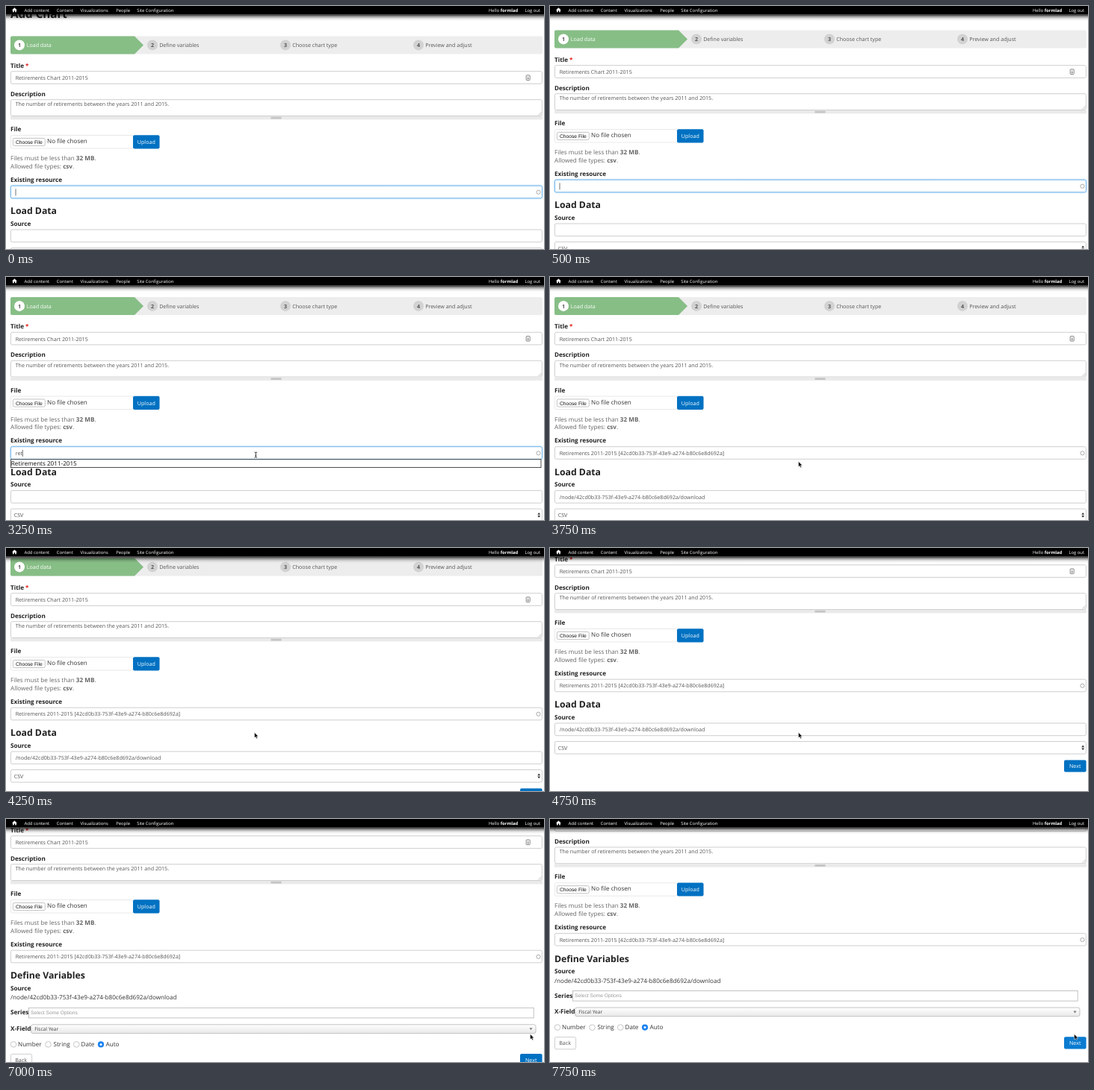
Recreate the animation shown at these times as an HTML page. Size 720 by 326 pixels, loop 8 s.

```html
<!DOCTYPE html>
<html lang="en">
<head>
<meta charset="utf-8">
<title>Add chart form</title>
<style>
  html, body { margin: 0; width: 100%; height: 100%; overflow: hidden; background: #fff; }
  svg { display: block; width: 100vw; height: 100vh; }
  text { font: 7.12px "Open Sans", sans-serif; fill: #555; text-rendering: geometricPrecision; white-space: pre; }
  .body { font-size: 8.13px; fill: #333; }
  .hint { font-size: 8.13px; fill: #666; }
  .label { font-size: 8.13px; font-weight: 700; fill: #222; }
  .h2 { font-size: 12.25px; font-weight: 700; fill: #222; }
  .h1 { font-size: 15.2px; font-weight: 700; fill: #222; }
  .bar { font-size: 5.92px; fill: #fff; }
  .native { font: 6.7px "Liberation Sans", Arial, sans-serif; fill: #111; }
  .chosen { font-size: 6.62px; fill: #444; }
  .white { fill: #fff; }
  .bold { font-weight: 700; }
  .red { fill: #e02020; }
  .box { fill: #fff; stroke: #c9c9c9; stroke-width: .9; }
  .focus { stroke: #66afe9; filter: drop-shadow(0 0 1.3px #66afe9aa); }
  .button { fill: #0071c2; }
  .hover { fill: #0a7bd0; }
</style>
</head>
<body>
<svg viewBox="0 0 720 326" preserveAspectRatio="none">
  <defs>
    <linearGradient id="shade" x2="0" y2="1">
      <stop offset="0" stop-color="#fff"/><stop offset="1" stop-color="#e8e8e8"/>
    </linearGradient>
    <linearGradient id="shadow" x2="0" y2="1">
      <stop offset="0" stop-color="#000" stop-opacity=".85"/>
      <stop offset=".3" stop-color="#000" stop-opacity=".4"/>
      <stop offset=".65" stop-color="#000" stop-opacity=".1"/>
      <stop offset="1" stop-color="#000" stop-opacity="0"/>
    </linearGradient>
  </defs>
  <g id="page">
    <g id="top"></g>
    <g id="load"></g>
    <g id="define"></g>
    <g id="menu"></g>
  </g>
  <g id="toolbar"></g>
  <path id="beam" d="M-1.8-3.6Q0-3.6 0-2.6Q0-3.6 1.8-3.6M0-2.6V2.6M-1.8 3.6Q0 3.6 0 2.6Q0 3.6 1.8 3.6M-.8 1H.8" fill="none" stroke="#111" stroke-width=".8"/>
  <path id="arrow" d="M0 0V7.3L1.7 5.8 2.8 8.3 4.1 7.7 3 5.3H5.2Z" stroke="#fff" stroke-width=".5"/>
</svg>
<script>
const $ = id => document.getElementById(id);
const LOOP = 8000, TICK = 250;

const text = (x, y, s, cls = '', id = '') => `<text x="${x}" y="${y}" class="${cls}" id="${id}">${s}</text>`;
const rect = (x, y, w, h, attrs = 'class="box"', r = 2) =>
  `<rect x="${x}" y="${y}" width="${w}" height="${h}" rx="${r}" ${attrs}/>`;
const circle = (x, y, r, attrs) => `<circle cx="${x}" cy="${y}" r="${r}" ${attrs}/>`;
const field = (y, h = 16.7, attrs) => rect(6.4, y, 711, h, attrs);
const button = (x, y, w, h, label, tx, id = '') =>
  rect(x, y, w, h, `class="button" id="${id}"`) + text(tx, y + h / 2 + 2.8, label, 'white');

const RESOURCE = '42cd0b33-753f-43e9-a274-b80c6e8d692a';
const PATH = `/node/${RESOURCE}/download`;
const PICKED = `Retirements 2011-2015 [${RESOURCE}]`;

const steps = ['Load data', 'Define variables', 'Choose chart type', 'Preview and adjust'].map((name, i) => {
  const x = 18 + 178 * i;
  return circle(x, 52.4, 7, `fill="${i ? '#d2d2d2' : '#fff'}"`)
    + text(x - 2, 55, i + 1, 'bold')
    + text(x + (i ? 9.2 : 9.7), 55, name, i ? '' : 'white');
}).join('');

$('top').innerHTML =
  text(6, 16, 'Add Chart', 'h1')
  + rect(6, 40.5, 712, 24, 'fill="#ededed"')
  + '<path d="M8 40.5H172L184 52.5 172 64.5H8Q6 64.5 6 62.5V42.5Q6 40.5 8 40.5Z" fill="#87be86"/>'
  + steps
  + text(6, 82.5, 'Title <tspan class="red">*</tspan>', 'label')
  + field(87.7)
  + text(12.7, 99.2, 'Retirements Chart 2011-2015')
  + rect(696.2, 92.9, 5, 6.6, 'fill="#fff" stroke="#777" stroke-width=".9"', .8)
  + '<path d="M698.7 94.6V97.4M697.6 97.5H699.8" stroke="#666" stroke-width=".8"/>'
  + text(6, 120.6, 'Description', 'label')
  + field(125.7, 21.8)
  + text(12.7, 134, 'The number of retirements between the years 2011 and 2015.')
  + '<path d="M712.5 146.5L716.5 142.5M714.8 146.5L716.5 144.8" stroke="#999" stroke-width=".6"/>'
  + rect(6, 148, 712, 4.4, 'fill="#eaeaea"', 0)
  + rect(354.5, 148.8, 14, 2.8, 'fill="#c4c4c4"', .5)
  + text(6, 168, 'File', 'label')
  + rect(6.4, 173.5, 164, 17.5, 'fill="#fff" stroke="#e4e4e4" stroke-width=".8"')
  + rect(9.3, 177.4, 43, 10.2, 'fill="#fff" stroke="#b4b4b4" stroke-width=".8"')
  + text(13, 185, 'Choose File', 'native')
  + text(55, 184, 'No file chosen', 'body')
  + button(170, 173.2, 35.5, 18.2, 'Upload', 175.8)
  + text(6, 207, 'Files must be less than <tspan class="bold">32 MB</tspan>.', 'hint')
  + text(6, 217.7, 'Allowed file types: <tspan class="bold">csv</tspan>.', 'hint')
  + text(6, 235.8, 'Existing resource', 'label')
  + field(241.2, 16.6, 'class="box" id="resource"')
  + text(12.7, 252.4, '', '', 'typed')
  + '<path id="caret" d="M0 245.4V254.4" stroke="#333" stroke-width=".7"/>'
  + circle(712.5, 249.8, 2.6, 'fill="none" stroke="#aaa" stroke-width="1"');

$('load').innerHTML =
  text(6, 279.4, 'Load Data', 'h2')
  + text(6, 294.8, 'Source', 'label')
  + field(300)
  + text(12.7, 311, PATH, '', 'source')
  + field(324.5)
  + text(10.7, 335.5, 'CSV')
  + '<path d="M711.3 332.2L713.2 329.6 715.1 332.2ZM711.3 333.6L713.2 336.2 715.1 333.6Z" fill="#333"/>'
  + button(688, 349.4, 29.6, 16.2, 'Next', 695, 'next1');

const radios = [[10, 'Number', 16], [56.5, 'String', 63.5], [94.2, 'Date', 100.5], [127, 'Auto', 133.5]]
  .map(([x, name, tx]) => (name === 'Auto'
    ? circle(x, 367.4, 4.1, 'fill="#1a82f0"') + circle(x, 367.4, 1.5, 'fill="#fff"')
    : circle(x, 367.4, 3.8, 'fill="#fff" stroke="#b8b8b8" stroke-width=".8"'))
    + text(tx, 370, name, 'body')).join('');

$('define').innerHTML =
  text(6, 279.4, 'Define Variables', 'h2')
  + text(6, 294.8, 'Source', 'label')
  + text(6, 307.4, PATH, 'body')
  + text(6, 327.4, 'Series', 'label')
  + rect(30.4, 318.3, 675.8, 13.6, 'fill="#fff" stroke="#b4b4b4" stroke-width=".8"', 0)
  + text(33, 327.3, '<tspan fill="#999">Select Some Options</tspan>', 'native')
  + text(6, 348.6, 'X-Field', 'label')
  + rect(33.6, 340.8, 675.4, 11.8, 'fill="url(#shade)" stroke="#b4b4b4" stroke-width=".8"', 2.5)
  + text(38.2, 349.1, 'Fiscal Year', 'chosen')
  + '<path d="M700.5 345.3H704.5L702.5 348.2Z" fill="#777"/>'
  + radios
  + rect(6.4, 380.4, 28.2, 16.2) + text(12.2, 391.3, 'Back')
  + button(688, 380, 29.6, 16.4, 'Next', 695, 'next2');

$('menu').innerHTML =
  rect(6.4, 258.2, 709.6, 10.9, 'id="option" fill="#fff" stroke="#222" stroke-width=".8"', 0)
  + text(6.8, 266.7, 'Retirements 2011-2015', 'body', 'optionText');

$('toolbar').innerHTML =
  rect(0, 0, 720, 11.5, '', 0)
  + rect(0, 11.5, 720, 8.5, 'fill="url(#shadow)"', 0)
  + '<path d="M8 5.4L11.4 2.2 14.8 5.4H13.8V8.2H12.2V6.2H10.6V8.2H9V5.4Z" fill="#fff"/>'
  + [[24.5, 'Add content'], [67.7, 'Content'], [99.4, 'Visualizations'], [147.2, 'People'],
     [175.2, 'Site Configuration'], [646, 'Hello <tspan class="bold">formlad</tspan>'], [694.4, 'Log out']]
    .map(([x, s]) => text(x, 7.7, s, 'bar')).join('');

// Tracks: [time, ...values]
const scroll = [[0, 0], [250, 3], [500, 8], [750, 12], [1000, 13.5], [3750, 13.5], [4000, 17],
  [4250, 27], [4500, 52], [4750, 65], [7250, 65], [7500, 77], [7750, 87.8]];
const typing = [[0, ''], [1500, 'r'], [1750, 're'], [2000, 'ret'], [3750, PICKED]];
const pointer = [[3500, 332.5, 247.5], [5000, 332.5, 247.5], [5250, 345, 243], [5500, 435, 246],
  [5750, 565, 264], [6000, 670, 283], [6250, 701.5, 288.5]];

const last = (track, t) => track.filter(k => k[0] <= t).pop() || track[0];
function tween(track, t) {
  const a = last(track, t), b = track[track.indexOf(a) + 1];
  if (!b || t < a[0]) return a.slice(1);
  const p = (t - a[0]) / (b[0] - a[0]);
  return a.slice(1).map((v, i) => v + (b[i + 1] - v) * p);
}
const show = (id, on) => { $(id).style.display = on ? '' : 'none'; };
const place = (id, x, y) => $(id).setAttribute('transform', `translate(${x} ${y})`);

function draw(t) {
  const [offset] = tween(scroll, t);
  const [x, y] = tween(pointer, t);
  const picked = t >= 3750, second = t >= 6750, hovering = t >= 3500;
  place('page', 0, -offset);
  $('typed').textContent = last(typing, t)[1];
  place('caret', 13 + (picked ? 0 : $('typed').getComputedTextLength()), 0);
  show('caret', !picked);
  $('resource').classList.toggle('focus', !picked);
  show('source', picked);
  show('menu', t >= 2500 && !picked);
  $('option').setAttribute('fill', hovering ? '#0072b9' : '#fff');
  $('optionText').style.fill = hovering ? '#fff' : '#111';
  show('load', !second);
  show('define', second);
  $('next1').classList.toggle('hover', t >= 6250);
  $('next2').classList.toggle('hover', t >= 7500);
  place('beam', 334.3, 238.6);
  show('beam', t >= 3000 && t < 3500);
  place('arrow', x, y);
  show('arrow', t >= 3500);
}

const start = performance.now();
function frame() {
  const t = (performance.now() - start) % LOOP;
  draw(Math.floor(t / TICK) * TICK);
  requestAnimationFrame(frame);
}
frame();
</script>
</body>
</html>
```
